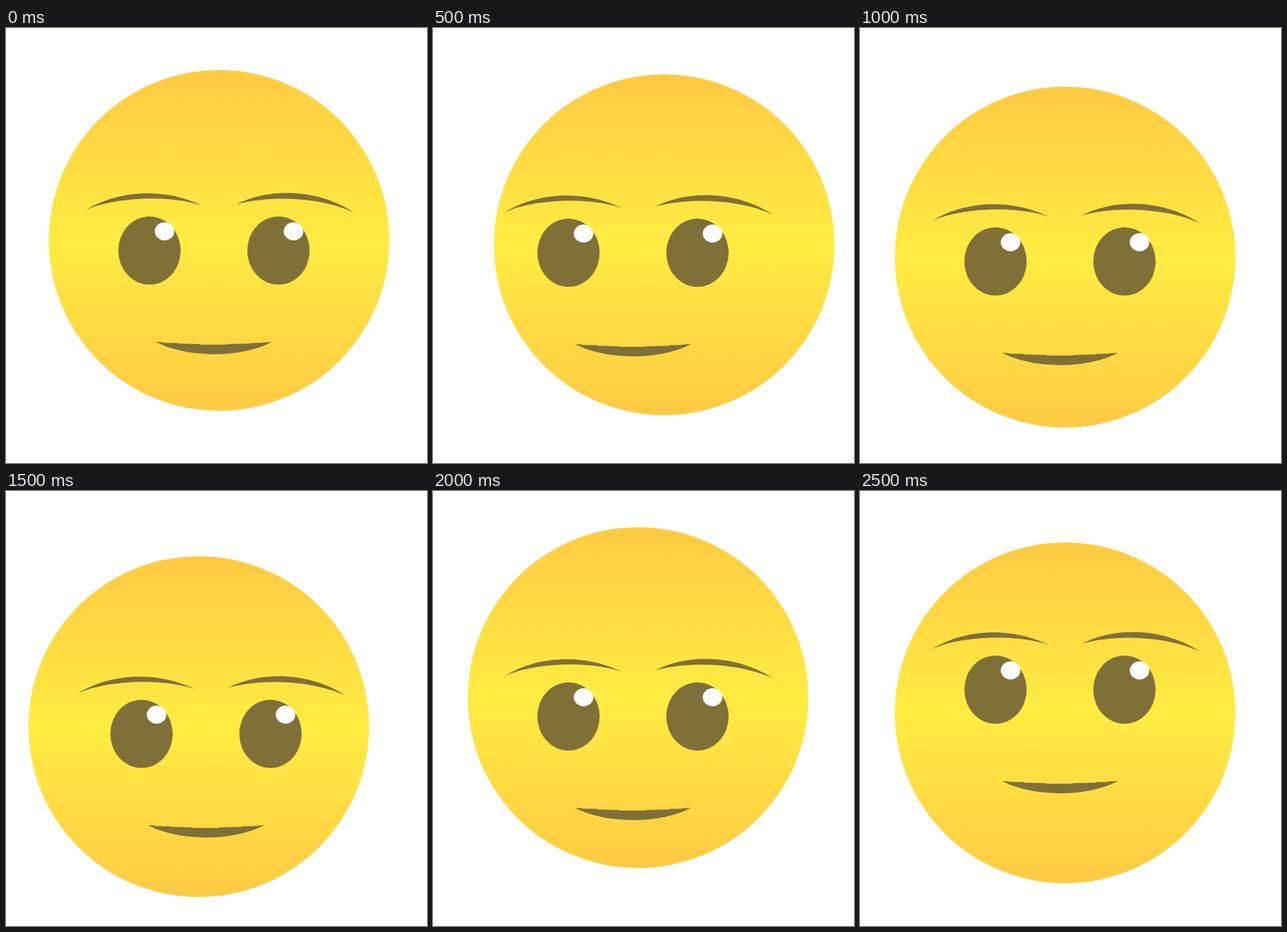
Write an HTML page that moves like this. It is 581 px wide and 600 px high and loops after 3000 ms.

```html
<!DOCTYPE html>
<html lang="en">
<head>
<meta charset="utf-8">
<title>Shifting smiley</title>
<style>
  html, body { margin: 0; width: 100%; height: 100%; overflow: hidden; background: #fff; }
  svg { display: block; width: 581px; height: 600px; }
</style>
</head>
<body>
<svg viewBox="0 0 581 600">
  <defs>
    <linearGradient id="skin" x2="0" y2="1">
      <stop offset="0" stop-color="#ffca44"/>
      <stop offset=".5" stop-color="#ffec42"/>
      <stop offset="1" stop-color="#ffca44"/>
    </linearGradient>
    <g id="eye">
      <ellipse rx="43" ry="47" fill="#7f7038"/>
      <ellipse cx="20.8" cy="-26.5" rx="13.5" ry="12.5" fill="#fff"/>
    </g>
  </defs>
  <circle id="head" r="235" fill="url(#skin)"/>
  <g id="face" fill="#7f7038">
    <path d="M108 252.5C150 225 215 218 271 245C220 228 140 235 108 252.5Z"/>
    <path d="M317 243.5C367 218 435 224 480 254.5C440 235 370 229 317 243.5Z"/>
    <use href="#eye" x="198" y="307"/>
    <use href="#eye" x="376" y="307"/>
    <path d="M207 433L217 433.5V434.3L238 434.6V435.3L268 436V436.8H305V436L337 435.3V434.6L354 434.3V433.7L367 433C325 455.6 250 455.6 207 433Z"/>
  </g>
</svg>
<script>
  const STEP = 500;
  // Head centre and face offset, each held for one step.
  const poses = [
    { head: [294, 293], face: [0, 0] },
    { head: [319, 299], face: [-11, 3] },
    { head: [283, 316], face: [-11, 15] },
    { head: [266, 325], face: [-11, 28] },
    { head: [283, 285], face: [-11, 4] },
    { head: [283, 306], face: [-11, -33] },
  ];
  const place = (id, [x, y]) =>
    document.getElementById(id).setAttribute("transform", `translate(${x} ${y})`);

  function draw() {
    const pose = poses[Math.floor(performance.now() / STEP) % poses.length];
    place("head", pose.head);
    place("face", pose.face);
    requestAnimationFrame(draw);
  }
  draw();
</script>
</body>
</html>
```
